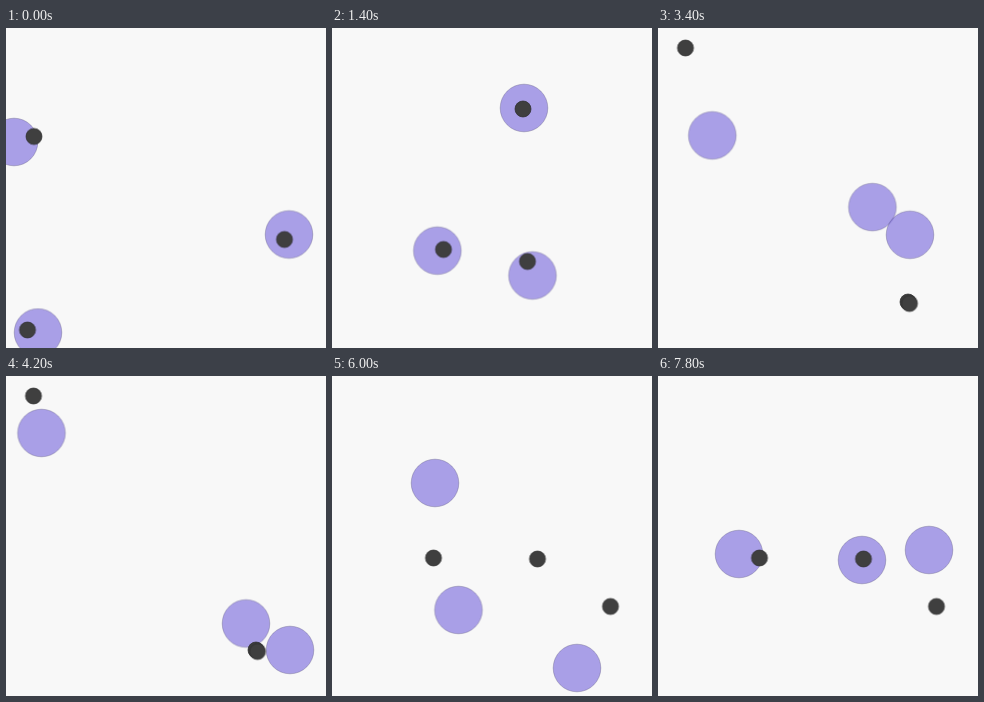
Write an HTML page without scripts that moves like this. It is 320x320 px and loops after 8 s.

```html
<!DOCTYPE html>
<html lang="en">
<head>
<meta charset="utf-8">
<title>Agents and landmarks</title>
<style>
  html, body { margin: 0; width: 100%; height: 100%; overflow: hidden; background: #f8f8f8; }
  svg { display: block; width: 100%; height: 100%; }

  /* 40 ticks of 200 ms; three episodes of 13 ticks start at 2.5%, 35% and 67.5% */
  circle { animation: 8s step-end -4ms infinite; }
  .agent { r: 23.8px; fill: rgb(118 101 221 / .6); stroke: rgb(70 64 110 / .45); stroke-width: .7px; }
  .mark { r: 8px; fill: #3f3f3f; stroke: #2c2c2c; stroke-width: .7px; }

  #a1 { animation-name: a1; }
  #a2 { animation-name: a2; }
  #a3 { animation-name: a3; }
  #m1 { animation-name: m1; }
  #m2 { animation-name: m2; }
  #m3 { animation-name: m3; }

  /* steps(n) walks n ticks to the next point; others hold, then jump */
  @keyframes a1 {
    0% { transform: translate(8px, 114px); }
    2.5% { transform: translate(178px, 47px); animation-timing-function: steps(2); }
    7.5% { transform: translate(184.5px, 64px); animation-timing-function: steps(2); }
    12.5% { transform: translate(190px, 82px); animation-timing-function: steps(4); }
    22.5% { transform: translate(194px, 78px); animation-timing-function: steps(4); }
    32.5% { transform: translate(192.5px, 85.5px); }
    35% { transform: translate(66px, 136px); animation-timing-function: steps(2); }
    40% { transform: translate(59px, 120px); animation-timing-function: steps(5); }
    52.5% { transform: translate(35.5px, 57px); animation-timing-function: steps(2); }
    57.5% { transform: translate(26px, 40px); animation-timing-function: steps(4); }
    65%, 67.4% { transform: translate(21px, 32px); }
    67.5% { transform: translate(68px, 89px); animation-timing-function: steps(3); }
    75% { transform: translate(103px, 107px); animation-timing-function: steps(3); }
    82.5% { transform: translate(158px, 135px); animation-timing-function: steps(2); }
    87.5% { transform: translate(191.5px, 150.5px); animation-timing-function: steps(1); }
    90% { transform: translate(210px, 151px); animation-timing-function: steps(3); }
    97.5%, 100% { transform: translate(271px, 174px); }
  }
  @keyframes a2 {
    0% { transform: translate(283px, 206.5px); }
    2.5% { transform: translate(74px, 221px); animation-timing-function: steps(2); }
    7.5% { transform: translate(88px, 222px); animation-timing-function: steps(3); }
    15% { transform: translate(106px, 223px); animation-timing-function: steps(3); }
    22.5% { transform: translate(104px, 222px); animation-timing-function: steps(4); }
    32.5% { transform: translate(111px, 223.5px); }
    35% { transform: translate(202px, 146px); animation-timing-function: steps(2); }
    40% { transform: translate(208px, 162px); animation-timing-function: steps(5); }
    52.5% { transform: translate(240px, 247.5px); animation-timing-function: steps(2); }
    57.5% { transform: translate(243px, 258px); animation-timing-function: steps(3); }
    65%, 67.4% { transform: translate(239px, 263px); }
    67.5% { transform: translate(126px, 239px); animation-timing-function: steps(3); }
    75% { transform: translate(126.5px, 234px); animation-timing-function: steps(5); }
    87.5% { transform: translate(126.5px, 215px); animation-timing-function: steps(1); }
    90% { transform: translate(120px, 207px); animation-timing-function: steps(3); }
    97.5%, 100% { transform: translate(81px, 178px); }
  }
  @keyframes a3 {
    0% { transform: translate(32px, 304.5px); }
    2.5% { transform: translate(192px, 267px); animation-timing-function: steps(2); }
    7.5% { transform: translate(195px, 256px); animation-timing-function: steps(2); }
    12.5% { transform: translate(198px, 246px); animation-timing-function: steps(4); }
    22.5% { transform: translate(203px, 249px); animation-timing-function: steps(4); }
    32.5% { transform: translate(202.5px, 243px); }
    35% { transform: translate(234px, 172px); animation-timing-function: steps(2); }
    40% { transform: translate(244px, 190px); animation-timing-function: steps(5); }
    52.5% { transform: translate(284px, 274px); animation-timing-function: steps(1); }
    55% { transform: translate(285px, 283px); animation-timing-function: steps(2); }
    60% { transform: translate(280px, 291px); animation-timing-function: steps(2); }
    65%, 67.4% { transform: translate(276px, 292px); }
    67.5% { transform: translate(251px, 318px); animation-timing-function: steps(1); }
    70% { transform: translate(250px, 312px); animation-timing-function: steps(2); }
    75% { transform: translate(245px, 292px); animation-timing-function: steps(3); }
    82.5% { transform: translate(230px, 229px); animation-timing-function: steps(2); }
    87.5% { transform: translate(215.5px, 190px); animation-timing-function: steps(2); }
    92.5% { transform: translate(205px, 179px); animation-timing-function: steps(2); }
    97.5%, 100% { transform: translate(204px, 184px); }
  }

  @keyframes m1 {
    0% { transform: translate(28px, 108.5px); }
    2.5% { transform: translate(191px, 81px); }
    35% { transform: translate(27.5px, 20px); }
    67.5%, 100% { transform: translate(101.5px, 182px); }
  }
  @keyframes m2 {
    0% { transform: translate(278.5px, 211.5px); }
    2.5% { transform: translate(111.5px, 221.5px); }
    35% { transform: translate(250px, 274px); }
    67.5%, 100% { transform: translate(205.5px, 183px); }
  }
  @keyframes m3 {
    0% { transform: translate(21.5px, 302px); }
    2.5% { transform: translate(195.5px, 233.5px); }
    35% { transform: translate(251.5px, 275.5px); }
    67.5%, 100% { transform: translate(278.5px, 230.5px); }
  }
</style>
</head>
<body>
<svg viewBox="0 0 320 320">
  <circle id="a1" class="agent" r="23.8"/>
  <circle id="a2" class="agent" r="23.8"/>
  <circle id="a3" class="agent" r="23.8"/>
  <circle id="m1" class="mark" r="8"/>
  <circle id="m2" class="mark" r="8"/>
  <circle id="m3" class="mark" r="8"/>
</svg>
</body>
</html>
```
